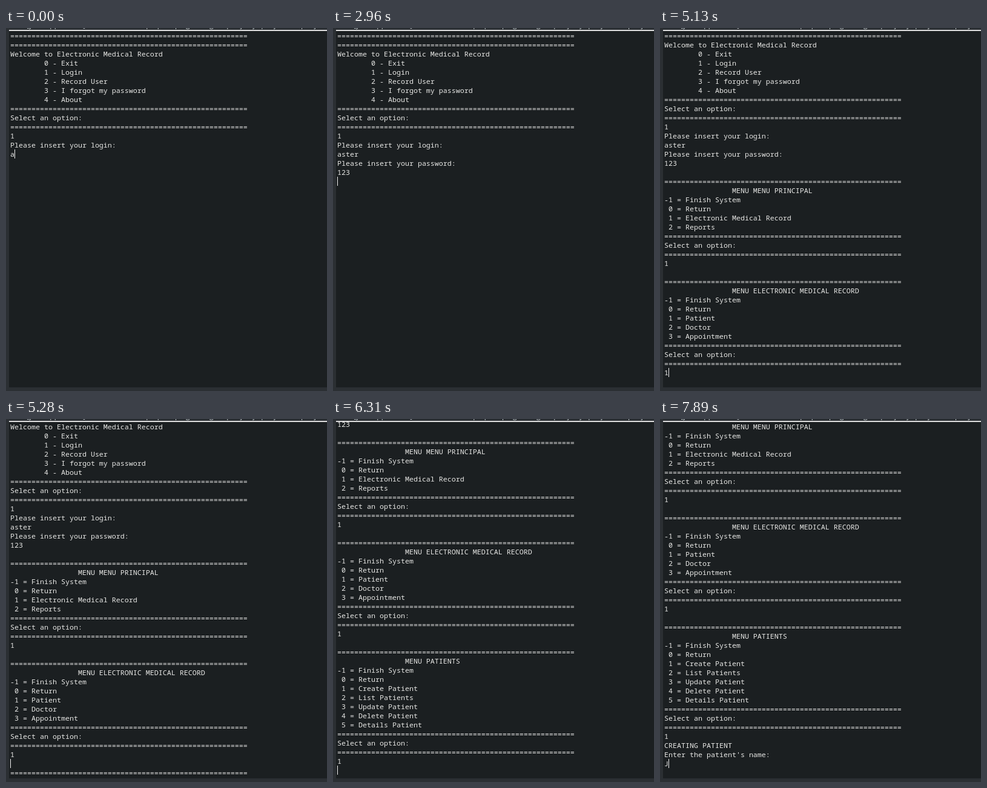
These frames come from a looping animation (530x598 px, 8 s). An HTML page:

```html
<!DOCTYPE html>
<html lang="en">
<head>
<meta charset="utf-8">
<title>Console</title>
<style>
html, body { margin: 0; width: 100%; height: 100%; overflow: hidden; background: #2b2f33; }
#title, #rule, #console { position: absolute; overflow: hidden; }
#title {
  left: 0; top: 0; width: 530px; height: 3px; color: #c8d0d4;
  font: 12px "Open Sans", sans-serif; white-space: pre;
}
#title span { position: absolute; left: 34px; top: -13px; line-height: 16px; }
#rule { left: 5px; top: 3px; width: 525px; height: 2px; background: #dcdcdc; }
#console { left: 5px; top: 5px; width: 525px; height: 587px; background: #1b1f21; }
#text {
  position: absolute; left: 2px; top: 0; margin: 0; color: #e8e8e6;
  font: 11.667px/15px "Noto Sans Mono", "DejaVu Sans Mono", monospace;
}
#caret { position: absolute; width: 1px; height: 15px; background: #f0f0f0; }
</style>
</head>
<body>
<div id="title"><span>[Java Application] C:\Users\Rowan\.p2\pool\plugins\org.eclipse.justj.openjdk.hotspot.jre.full</span></div>
<div id="rule"></div>
<div id="console"><pre id="text"></pre><div id="caret"></div></div>
<script>
const LOOP = 8000, ROW = 15, COL = 7;
const bar = "=".repeat(56);
const prompt = [bar, "Select an option:", bar, "1"];
const menu = (name, ...items) => [
  "", bar, " ".repeat(16) + "MENU " + name, "-1 = Finish System",
  ...["Return", ...items].map((item, i) => ` ${i} = ${item}`),
  ...prompt
];

const lines = [
  bar, bar, "Welcome to Electronic Medical Record",
  ...["Exit", "Login", "Record User", "I forgot my password", "About"]
    .map((item, i) => " ".repeat(8) + `${i} - ${item}`),
  ...prompt,
  "Please insert your login:", "aster",
  "Please insert your password:", "123",
  ...menu("MENU PRINCIPAL", "Electronic Medical Record", "Reports"),
  ...menu("ELECTRONIC MEDICAL RECORD", "Patient", "Doctor", "Appointment"),
  ...menu("PATIENTS", ...["Create", "List", "Update", "Delete", "Details"].map(v => v + " Patient" + (v === "List" ? "s" : ""))),
  "CREATING PATIENT", "Enter the patient's name:", "J"
];

// rows: lines printed, cols: length of the last one, top: scroll in px,
// line/col/on: caret. Each step changes only what it names.
const steps = [
  [0, { rows: 14, cols: 1, top: 0, line: 13, col: 1, on: true }],
  [150, { cols: 2, col: 2 }],
  [430, { cols: 3, col: 3 }],
  [970, { cols: 4, col: 4 }],
  [1270, { cols: 5, col: 5 }],
  [1540, { rows: 15, cols: 99, line: 14, col: 0 }],
  [2100, { on: false }],
  [2530, { rows: 16, cols: 2, line: 15, col: 2 }],
  [2680, { on: true }],
  [2840, { cols: 3, col: 3 }],
  [2960, { line: 16, col: 0 }],
  [3120, { rows: 26, cols: 99 }],
  [3550, { on: false }],
  [4160, { rows: 27, line: 26, col: 1, on: true }],
  [4280, { on: false }],
  [4430, { rows: 38, top: ROW, line: 27, col: 0, on: true }],
  [4980, { on: false }],
  [5130, { rows: 39, line: 38, col: 1, on: true }],
  [5280, { rows: 41, top: 2 * ROW, line: 39, col: 0 }],
  [5400, { rows: 52, top: 15 * ROW }],
  [5860, { on: false }],
  [6010, { rows: 53, line: 52, col: 1, on: true }],
  [6310, { top: 15 * ROW + 4, line: 53, col: 0 }],
  [6460, { rows: 55, top: 18 * ROW }],
  [6900, { on: false }],
  [7480, { on: true }],
  [7890, { rows: 56, line: 55, col: 1 }]
];

const text = document.getElementById("text");
const caret = document.getElementById("caret");
let shown = 0;

function draw() {
  const t = performance.now() % LOOP;
  const past = steps.filter(([start]) => start <= t);
  if (past.length !== shown) {
    shown = past.length;
    const s = Object.assign({}, ...past.map(step => step[1]));
    const last = lines[s.rows - 1].slice(0, s.cols);
    text.textContent = [...lines.slice(0, s.rows - 1), last].join("\n");
    text.style.top = -s.top + "px";
    caret.style.left = 2 + s.col * COL + "px";
    caret.style.top = s.line * ROW - s.top + "px";
    caret.style.visibility = s.on ? "visible" : "hidden";
  }
  requestAnimationFrame(draw);
}
draw();
</script>
</body>
</html>
```
